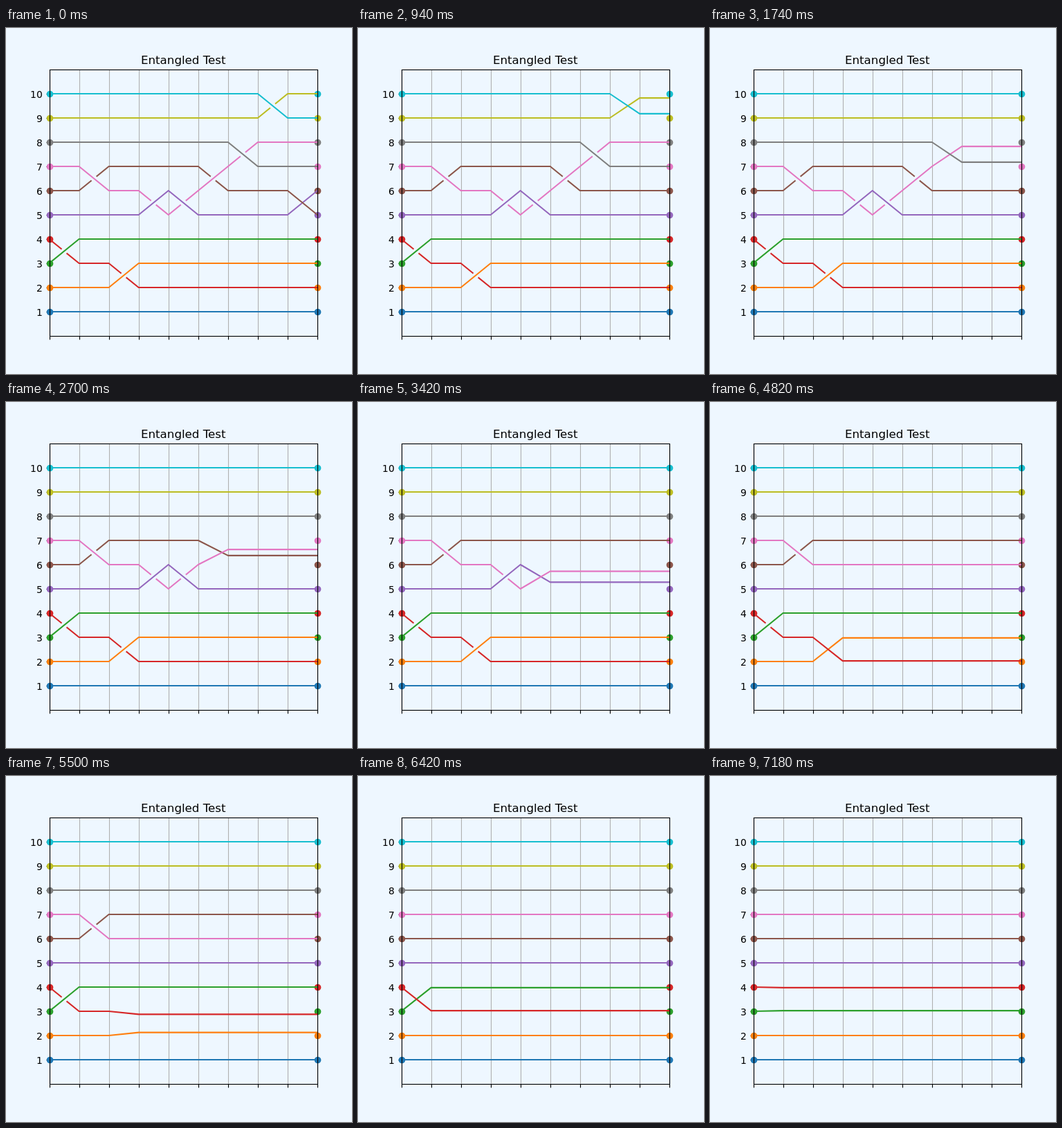
An HTML page with a canvas that plays this animation: 500x500 px, repeating every 7.2 s.

```html
<!DOCTYPE html>
<html lang="en">
<head>
<meta charset="utf-8">
<title>Entangled Test</title>
<style>
  html, body { margin: 0; width: 100%; height: 100%; overflow: hidden; background: #eef7ff; }
  canvas { display: block; width: 100vw; height: 100vh; }
</style>
</head>
<body>
<canvas id="stage" width="500" height="500"></canvas>
<script>
const ctx = document.getElementById('stage').getContext('2d');
const COLORS = ['#1f77b4', '#ff7f0e', '#2ca02c', '#d62728', '#9467bd',
                '#8c564b', '#e377c2', '#7f7f7f', '#bcbd22', '#17becf'];
const PT = 100 / 72;
const LEFT = 62.5, RIGHT = 450, TOP = 60, BOTTOM = 445;
const STEP = 20, FRAMES_PER_SWAP = 40;

// Each crossing swaps rows low and low + 1; `under` is the wire passing below.
const SWAPS = [
  { low: 3, under: 'upper' },
  { low: 6, under: 'lower' },
  { low: 2, under: 'upper' },
  { low: 5, under: 'upper' },
  { low: 5, under: 'lower' },
  { low: 6, under: 'upper' },
  { low: 7, under: 'lower' },
  { low: 9, under: 'lower' },
  { low: 5, under: 'upper' }
];
const COUNT = SWAPS.length;
const LOOP = COUNT * FRAMES_PER_SWAP;

const colX = i => LEFT + (RIGHT - LEFT) * i / COUNT;
const rowY = r => BOTTOM - (BOTTOM - TOP) * r / 11;
const snap = v => Math.floor(v + 0.5) + 0.5;

function line(x1, y1, x2, y2, color) {
  ctx.strokeStyle = color;
  ctx.lineWidth = 0.8 * PT;
  ctx.lineCap = 'butt';
  ctx.beginPath();
  ctx.moveTo(x1, y1);
  ctx.lineTo(x2, y2);
  ctx.stroke();
}

function dot(x, y, color) {
  ctx.fillStyle = color;
  ctx.beginPath();
  ctx.arc(snap(x), snap(y), 3.5 * PT, 0, Math.PI * 2);
  ctx.fill();
}

function drawAxes() {
  for (let i = 0; i <= COUNT; i++) {
    const x = snap(colX(i));
    line(x, TOP, x, BOTTOM, '#b0b0b0');
    line(x, snap(BOTTOM), x, snap(BOTTOM) + 5, '#000');
  }
  COLORS.forEach((color, w) => {
    const y = rowY(w + 1);
    line(snap(LEFT) - 5, snap(y), snap(LEFT), snap(y), '#000');
    dot(LEFT, y, color);
    dot(RIGHT, y, color);
  });
}

function drawWire(wire, active, progress) {
  let row = wire + 1;
  ctx.beginPath();
  ctx.moveTo(colX(0), rowY(row));
  for (let c = 0; c <= active; c++) {
    const { low, under } = SWAPS[c];
    const dir = row === low ? 1 : row === low + 1 ? -1 : 0;
    const next = row + dir * (c === active ? 1 - progress : 1);
    const isUnder = dir === (under === 'upper' ? -1 : 1);
    if (isUnder && c < active) {
      ctx.lineTo(colX(c + 0.4), rowY(row + 0.4 * dir));
      ctx.moveTo(colX(c + 0.6), rowY(row + 0.6 * dir));
    }
    ctx.lineTo(colX(c + 1), rowY(next));
    row = next;
  }
  ctx.lineTo(RIGHT, rowY(row));
  ctx.strokeStyle = COLORS[wire];
  ctx.lineWidth = 1.5 * PT;
  ctx.lineCap = 'square';
  ctx.lineJoin = 'round';
  ctx.stroke();
}

function drawFrame() {
  ctx.strokeStyle = '#000';
  ctx.lineWidth = 0.8 * PT;
  ctx.lineJoin = 'miter';
  ctx.strokeRect(snap(LEFT), snap(TOP), snap(RIGHT) - snap(LEFT), snap(BOTTOM) - snap(TOP));
}

function drawText() {
  ctx.fillStyle = '#000';
  ctx.textBaseline = 'alphabetic';
  ctx.textAlign = 'center';
  ctx.font = `${12 * PT}px "DejaVu Sans", sans-serif`;
  ctx.fillText('Entangled Test', (LEFT + RIGHT) / 2, 52);
  ctx.textAlign = 'right';
  ctx.font = `${10 * PT}px "DejaVu Sans", sans-serif`;
  for (let r = 1; r <= 10; r++) ctx.fillText(r, LEFT - 7 * PT, rowY(r) + 6);
}

function draw(ms) {
  const tick = Math.floor(ms / STEP) % LOOP;
  const active = COUNT - 1 - Math.floor(tick / FRAMES_PER_SWAP);
  const progress = (tick % FRAMES_PER_SWAP) / FRAMES_PER_SWAP;

  ctx.fillStyle = '#eef7ff';
  ctx.fillRect(0, 0, 500, 500);
  drawAxes();

  ctx.save();
  ctx.beginPath();
  ctx.rect(LEFT, TOP, RIGHT - LEFT, BOTTOM - TOP);
  ctx.clip();
  COLORS.forEach((_, w) => drawWire(w, active, progress));
  ctx.restore();

  drawFrame();
  drawText();
}

let start = null;
function loop(now) {
  if (start === null) start = now;
  draw(Math.max(0, now - start));
  requestAnimationFrame(loop);
}
draw(0);
requestAnimationFrame(loop);
</script>
</body>
</html>
```
